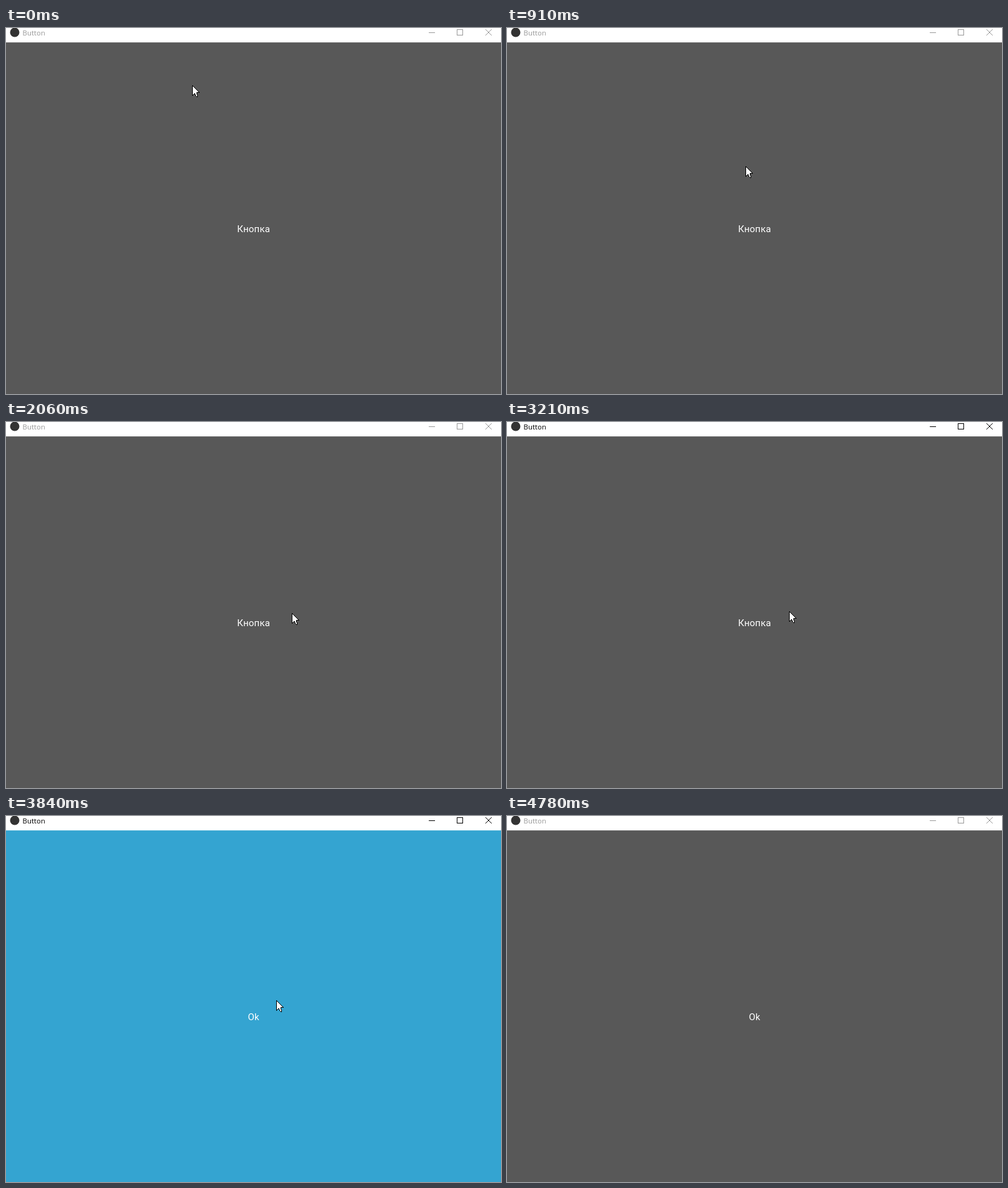
An HTML page for the animation above (4880 ms loop, 795 by 588 pixels).

```html
<!DOCTYPE html>
<html lang="ru">
<head>
<meta charset="utf-8">
<title>Button</title>
<style>
html, body { margin: 0; width: 100%; height: 100%; overflow: hidden; background: #fff; }
svg { display: block; }
#title { font: 11.4px "Open Sans", sans-serif; }
#label { font: 15px Roboto, sans-serif; fill: #fff; text-anchor: middle; letter-spacing: .2px; }
</style>
</head>
<body>
<svg width="795" height="588" viewBox="0 0 795 588">
  <circle cx="14" cy="7" r="7.5" fill="#333"/>
  <text id="title" x="26.6" y="12">Button</text>
  <g id="controls" fill="none">
    <path d="M679 7.5h10M724.5 2.5h9v9h-9z" shape-rendering="crispEdges"/>
    <path d="M770 2l10 10m0-10l-10 10"/>
  </g>
  <rect id="button" y="23" width="795" height="565"/>
  <rect y="23" width="795" height="1" fill="#fff" opacity=".15"/>
  <text id="label" x="397.7" y="328"></text>
  <path id="cursor" d="M.5 .5V16.5L4 13 5.5 16.5 7.5 18.5H8.5V16.5L7 12.5V11.5H11.5Z"
        fill="#fff" stroke="#000" shape-rendering="crispEdges"/>
</svg>
<script>
const LOOP = 4880, STEP = 130, HOME = [299, 92];
// pointer stops: x, y, arrival time, time of the first step there
const stops = [
  [321, 154, 510, 120], [383, 222, 910], [414, 323, 1180, 1060], [424, 332, 1330],
  [471, 310, 1610], [481, 307, 1760], [459, 307, 1910], [434, 296, 3600, 3210],
  [439, 299, 4080], [729, 584, 4350, 4230], [800, 600, 4500]
];
const [title, controls, button, label, cursor] =
  ["title", "controls", "button", "label", "cursor"].map(id => document.getElementById(id));

// Equal steps from stop to stop, the last one landing on the arrival time.
function pointer(t) {
  let [px, py] = HOME;
  for (const [x, y, end, start = end] of stops) {
    if (t < start) break;
    const gaps = Math.round((end - start) / STEP);
    const done = gaps ? Math.min(gaps, Math.floor((t - start) / (end - start) * gaps)) : 0;
    const part = (done + 1) / (gaps + 1);
    px += (x - px) * part;
    py += (y - py) * part;
  }
  return [Math.round(px), Math.round(py)];
}

function draw(t) {
  const ink = t >= 2620 && t < 4780 ? "#000" : "#999";
  const pressed = t >= 3840 && t < 3960;

  title.setAttribute("fill", ink);
  controls.setAttribute("stroke", ink);
  button.setAttribute("fill", pressed ? "#34a4d1" : "#585858");
  label.textContent = t >= 3840 ? "Ok" : "Кнопка";
  cursor.setAttribute("transform", `translate(${pointer(t)})`);
}

const start = performance.now();
function tick() {
  draw((performance.now() - start) % LOOP);
  requestAnimationFrame(tick);
}
tick();
</script>
</body>
</html>
```
